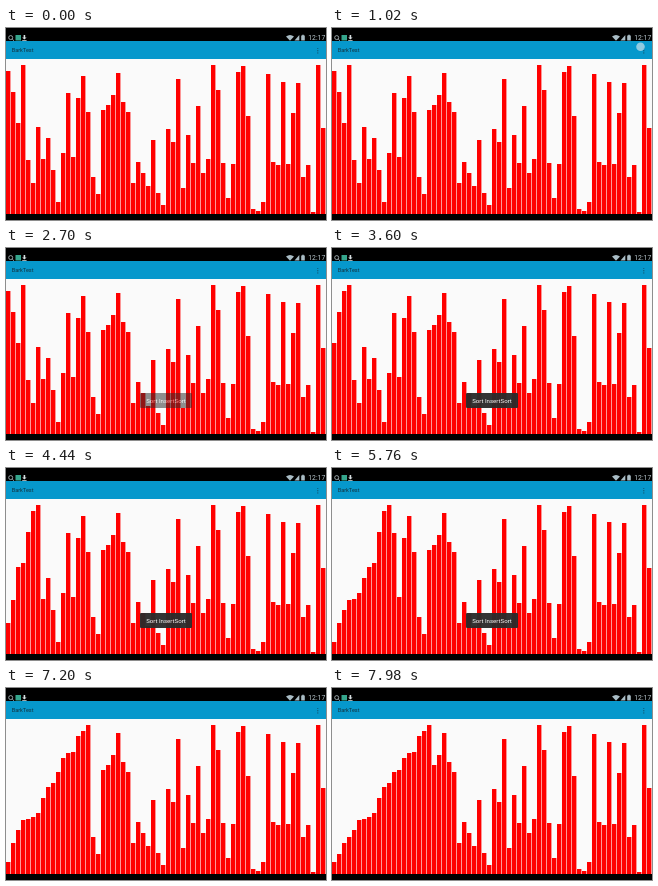
An HTML page that plays this animation: 320 by 192 pixels, repeating every 8 s.

```html
<!DOCTYPE html>
<html lang="en">
<head>
<meta charset="utf-8">
<title>Insertion sort</title>
<style>
  html, body { margin: 0; width: 100%; height: 100%; overflow: hidden; background: #000; }
  svg { display: block; width: 100vw; height: 100vh; }
  text { font-family: Roboto, "Noto Sans", sans-serif; }
</style>
</head>
<body>
<svg viewBox="0 0 320 192" preserveAspectRatio="none">
  <rect width="320" height="192"/>
  <rect y="13" width="320" height="18" fill="#0698cc"/>
  <rect y="31" width="320" height="155" fill="#fafafa"/>

  <!-- Status bar -->
  <g fill="none" stroke="#b8c4c8" stroke-width=".8">
    <circle cx="4.7" cy="9.6" r="2"/>
    <path d="M6.2 11.1 8 12.8"/>
  </g>
  <rect x="9.5" y="7" width="5.5" height="5.5" fill="#35a58c"/>
  <path d="M17.6 7h1.6v2.4h1.4l-2.2 2.2-2.2-2.2h1.4zM16.2 12h4.4v.8h-4.4z" fill="#d8e0e2"/>
  <g fill="#a9bcc5">
    <path d="M280 8.6q4-3.2 8 0l-4 4.2z"/>
    <path d="M288.5 12.6 293.3 7v5.6z"/>
    <path d="M295.2 7.6h1v-.9h1.6v.9h1v5h-3.6z"/>
  </g>
  <text x="302.3" y="12.4" font-size="6.8" fill="#b9c8ce">12:17</text>

  <!-- Toolbar -->
  <text x="5.8" y="24.4" font-size="5.5" fill="#12303c">BarkTest</text>
  <g fill="#12506a">
    <circle cx="311.8" cy="20.5" r=".6"/>
    <circle cx="311.8" cy="22.7" r=".6"/>
    <circle cx="311.8" cy="24.9" r=".6"/>
  </g>

  <path id="bars" fill="#f00"/>

  <g id="toast">
    <rect x="134" y="145" width="52" height="15" rx="1" fill="#2b2b2b"/>
    <text x="160" y="154.6" font-size="6.1" fill="#fff" text-anchor="middle">Sort InsertSort</text>
  </g>
  <circle id="touch" cx="308.5" cy="18.7" r="4.3" fill="#bfdce8" opacity="0"/>
</svg>
<script>
  const LOOP = 8000, STEP = 272, SORT_START = 2400;
  const FLOOR = 186, PITCH = 5, BAR = 4.4;

  const tops = [
    43, 64, 95, 37, 132, 155, 99, 131, 110, 142, 174, 125, 65, 129, 70, 48,
    84, 149, 166, 82, 77, 67, 45, 74, 84, 155, 134, 145, 158, 112, 165, 177,
    101, 114, 51, 160, 107, 135, 78, 145, 131, 37, 62, 135, 170, 136, 44, 38,
    88, 181, 183, 174, 46, 134, 137, 54, 136, 85, 55, 149, 137, 184, 37, 100
  ];

  const [bars, toast, touch] =
    ['bars', 'toast', 'touch'].map(id => document.getElementById(id));
  const clamp = v => Math.max(0, Math.min(1, v));
  let drawnCount = -1;

  // The leading `count` bars are in order, shortest first.
  function drawBars(count) {
    if (count === drawnCount) return;
    drawnCount = count;
    const sorted = tops.slice(0, count).sort((a, b) => b - a);
    bars.setAttribute('d', [...sorted, ...tops.slice(count)]
      .map((top, i) => `M${i * PITCH} ${top}h${BAR}V${FLOOR}h${-BAR}z`)
      .join(''));
  }

  function render(t) {
    const count = Math.floor((t - SORT_START) / STEP);
    drawBars(Math.max(1, count));
    toast.setAttribute('opacity',
      0.96 * Math.min(clamp((t - 2560) / 260), clamp((6400 - t) / 300)));
    touch.setAttribute('opacity', t >= 900 && t < 1140 ? 0.75 : 0);
  }

  let start;
  function tick(now) {
    start ??= now;
    render((now - start) % LOOP);
    requestAnimationFrame(tick);
  }
  render(0);
  requestAnimationFrame(tick);
</script>
</body>
</html>
```
